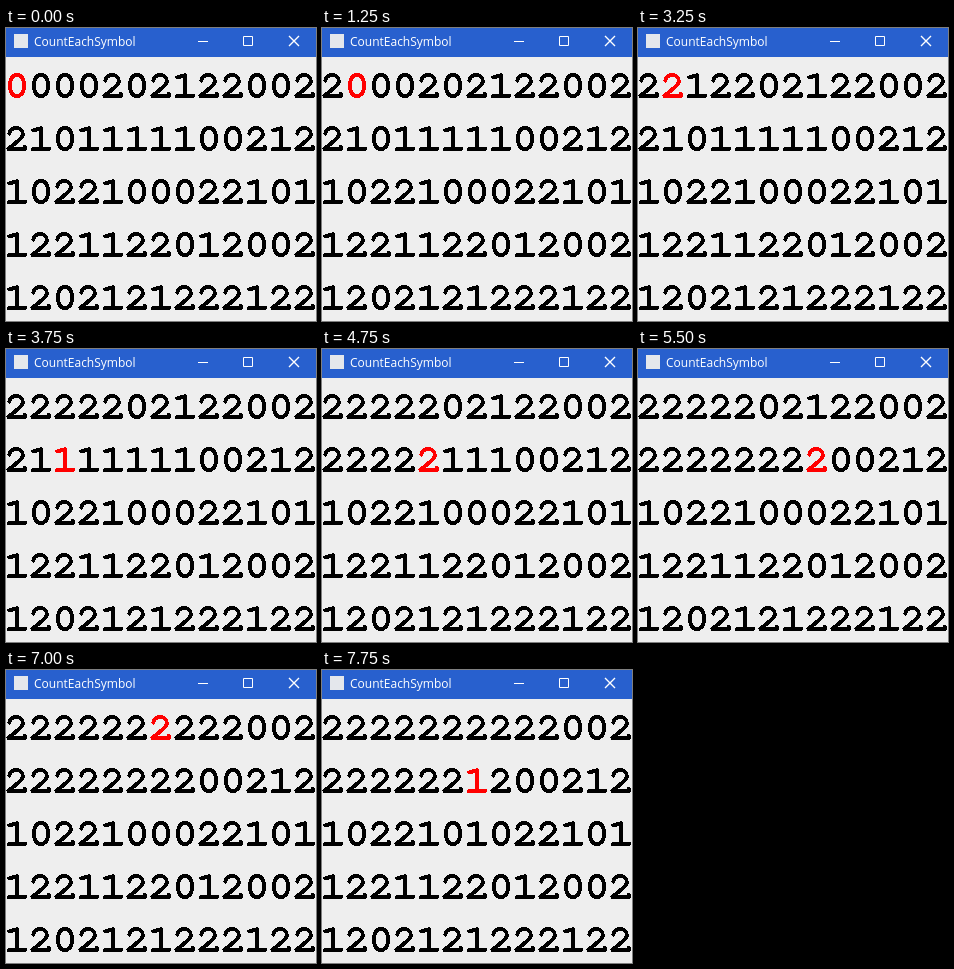
An HTML page for the animation above (8000 ms loop, 310x293 px).

```html
<!DOCTYPE html>
<html lang="en">
<head>
<meta charset="utf-8">
<title>CountEachSymbol</title>
<style>
  html, body { margin: 0; width: 100%; height: 100%; overflow: hidden; background: #eee; }
  svg { display: block; }
  .title { font: 12px "Open Sans", "Noto Sans", sans-serif; fill: #fff; }
  .buttons { fill: none; stroke: #fff; }
  .close { stroke: #fff; stroke-width: 1.4; }
  #grid { fill: none; stroke-width: 4; stroke-linecap: round; stroke-linejoin: round; shape-rendering: crispEdges; }
</style>
</head>
<body>
<svg width="310" height="293" viewBox="0 0 310 293">
  <defs>
    <rect id="digit0" x="4" y="2" width="14" height="21" rx="7" ry="9"/>
    <path id="digit1" d="M3.2 4.4L11 2.2V23M3 23H19"/>
    <path id="digit2" d="M3.4 7.6C3.8 4 6.6 2 9.9 2C13.8 2 16.8 4.6 16.8 8C16.8 10.4 15.2 12.1 12.6 14.4L2.4 23H18.8V21"/>
  </defs>
  <rect width="310" height="293" fill="#eee"/>
  <rect width="310" height="29" fill="#2860ce"/>
  <rect x="8" y="6" width="14" height="14" fill="#e4e7ec"/>
  <text class="title" x="28" y="18">CountEachSymbol</text>
  <path class="buttons" d="M192 13.5H202M237.5 8.5H246.5V17.5H237.5Z"/>
  <path class="close" d="M283 8L293 18M293 8L283 18"/>
  <g id="grid"></g>
</svg>
<script>
const START = ["0000202122002", "2101111100212", "1022100022101", "1221122012002", "1202121222122"];
// Every cell the cursor enters goes up by one, modulo 3.
const MOVES = "RLRLRRRLRLLRLRDLRRRRRRULLRLRDDU";
const STEP_MS = 250, LOOP_MS = 8000;
const DIRECTIONS = { L: [0, -1], R: [0, 1], U: [-1, 0], D: [1, 0] };
const grid = document.getElementById("grid");

const cells = START.map((line, row) => [...line].map((_, col) => {
  const cell = document.createElementNS("http://www.w3.org/2000/svg", "use");
  cell.setAttribute("x", col * 24);
  cell.setAttribute("y", 45 + row * 53);
  return grid.appendChild(cell);
}));

function draw(step) {
  const values = START.map(line => [...line].map(Number));
  let row = 0, col = 0;
  for (const move of MOVES.slice(0, step)) {
    const [dy, dx] = DIRECTIONS[move];
    row += dy;
    col += dx;
    values[row][col] = (values[row][col] + 1) % 3;
  }
  cells.forEach((line, r) => line.forEach((cell, c) => {
    cell.setAttribute("href", "#digit" + values[r][c]);
    cell.setAttribute("stroke", r === row && c === col ? "#f00" : "#000");
  }));
}

let shown = -1;
function tick() {
  const step = Math.floor(performance.now() % LOOP_MS / STEP_MS);
  if (step !== shown) draw(shown = step);
  requestAnimationFrame(tick);
}
tick();
</script>
</body>
</html>
```
